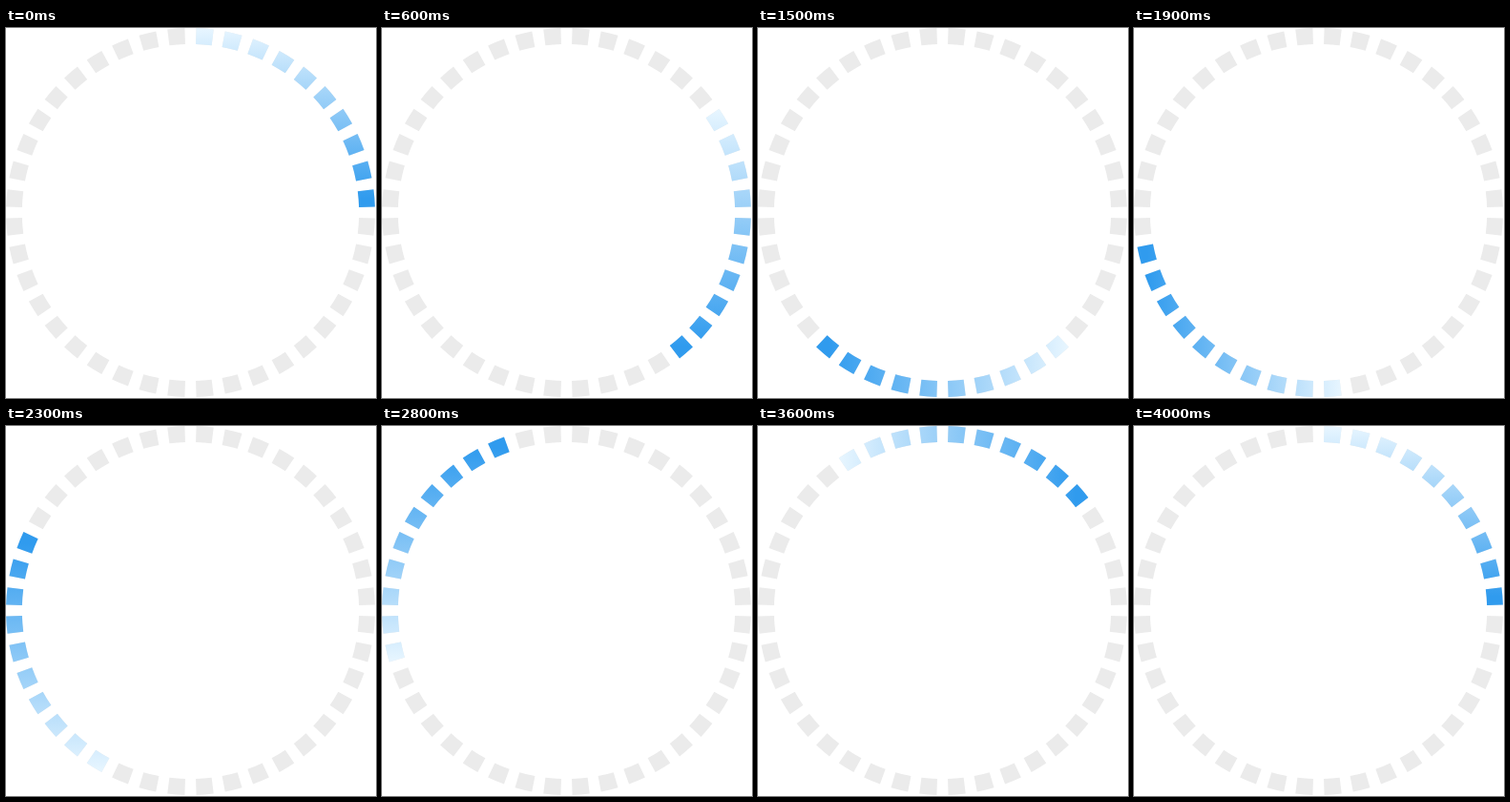
These frames come from a looping animation (388 by 388 pixels, 4.1 s). An HTML page with a canvas:

```html
<!DOCTYPE html>
<html lang="en">
<head>
<meta charset="utf-8">
<title>Ring loader</title>
<style>
  html, body { margin: 0; width: 100%; height: 100%; overflow: hidden; background: #fff; }
  canvas { display: block; width: 388px; height: 388px; }
</style>
</head>
<body>
<canvas id="ring" width="388" height="388"></canvas>
<script>
const ctx = document.getElementById('ring').getContext('2d');
const COUNT = 40, TAIL = 10, FRAME_MS = 100, FRAMES = 41;
const CENTER = 193.5, OUTER = 193.5, INNER = 176.7;
const PITCH = 2 * Math.PI / COUNT, HALF = PITCH * 0.3;

// Angles run clockwise from the top.
const angleOf = i => (i + 0.5) * PITCH - Math.PI / 2;
const pointAt = (r, a) => [CENTER + r * Math.cos(a), CENTER + r * Math.sin(a)];

function addBlock(path, i) {
  const a = angleOf(i);
  path.moveTo(...pointAt(INNER, a - HALF));
  path.arc(CENTER, CENTER, OUTER, a - HALF, a + HALF);
  path.arc(CENTER, CENTER, INNER, a + HALF, a - HALF, true);
  path.closePath();
}

function blocks(from, count) {
  const path = new Path2D();
  for (let i = from; i < from + count; i++) addBlock(path, i);
  return path;
}

function bounds(from, count) {
  const xs = [], ys = [];
  for (let i = from; i < from + count; i++) {
    for (const r of [INNER, OUTER]) {
      for (const d of [-HALF, HALF]) {
        const [x, y] = pointAt(r, angleOf(i) + d);
        xs.push(x);
        ys.push(y);
      }
    }
  }
  return [Math.min(...xs), Math.min(...ys), Math.max(...xs), Math.max(...ys)];
}

// The tail fades along one axis, chosen by where the head is.
function tailFill(from, head) {
  const [l, t, r, b] = bounds(from, TAIL);
  const axis = head <= 20 ? [0, t, 0, b]
    : head <= 30 ? [r, 0, l, 0]
    : head <= 42 ? [0, b, 0, t]
    : [l, 0, r, 0];
  const fill = ctx.createLinearGradient(...axis);
  fill.addColorStop(0, '#e8f6ff');
  fill.addColorStop(0.95, '#309bee');
  return fill;
}

const base = blocks(0, COUNT);

function draw(step) {
  ctx.fillStyle = '#fff';
  ctx.fillRect(0, 0, 388, 388);
  ctx.fillStyle = '#ebebeb';
  ctx.fill(base);
  ctx.fillStyle = tailFill(step, step + TAIL - 1);
  ctx.fill(blocks(step, TAIL));
}

const start = performance.now();
function tick() {
  const frame = Math.floor((performance.now() - start) / FRAME_MS) % FRAMES;
  draw(frame % COUNT);
  requestAnimationFrame(tick);
}
tick();
</script>
</body>
</html>
```
